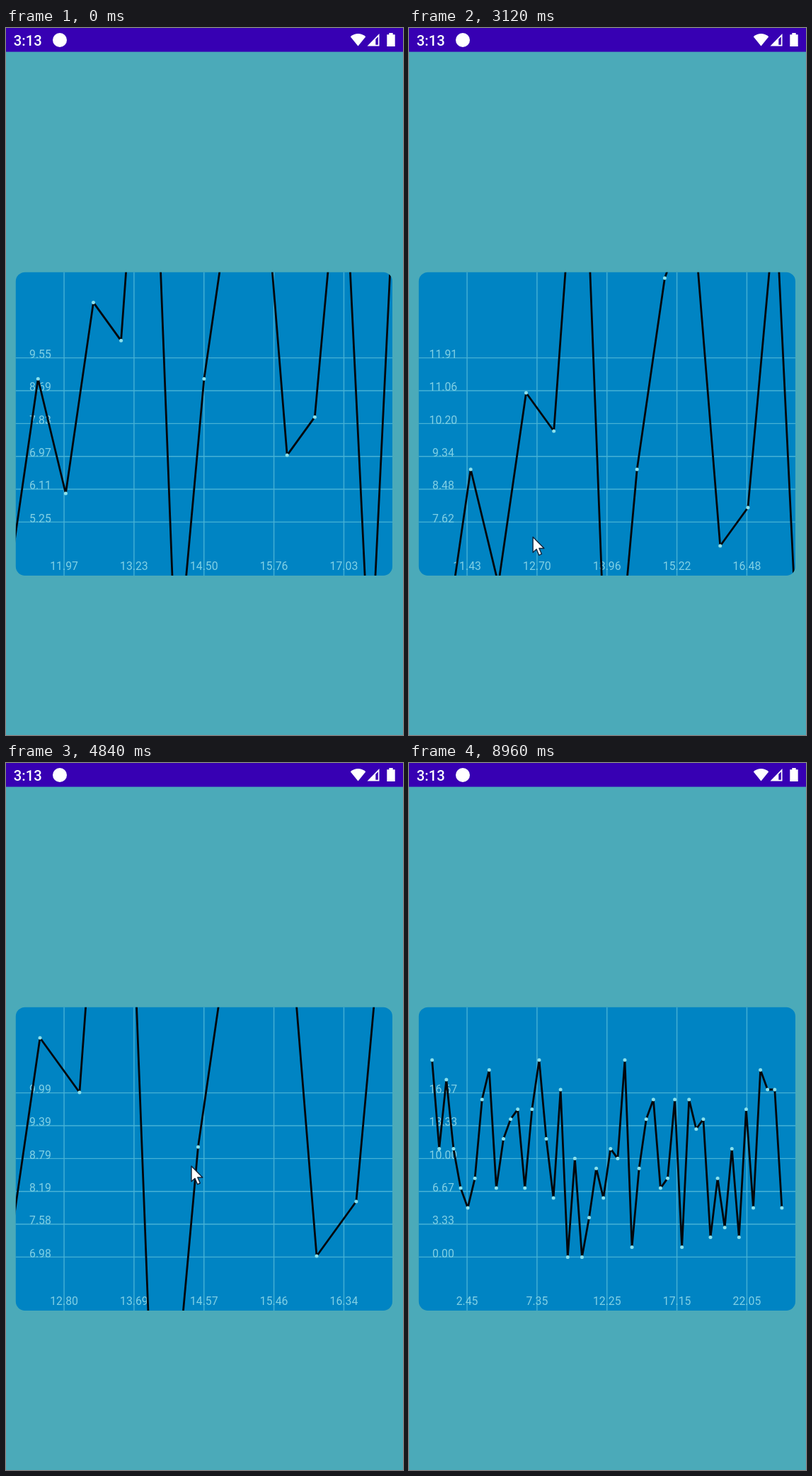
Recreate the animation shown at these times as an HTML page with a canvas. Size 561 by 998 pixels, loop 9000 ms.

```html
<!DOCTYPE html>
<html lang="en">
<head>
<meta charset="utf-8">
<title>Zoomable line chart</title>
<style>
  html, body { margin: 0; width: 100%; height: 100%; overflow: hidden; background: #4baab9; }
  canvas { display: block; width: 561px; height: 998px; }
</style>
</head>
<body>
<canvas id="stage" width="561" height="998"></canvas>
<script>
const ctx = document.getElementById('stage').getContext('2d');
const LOOP = 9000;

const CARD = { x: 13.8, y: 344.7, w: 532.2, h: 428.4, r: 13 };
const MID_X = 279.75, STEP_X = 98.85, UNIT_X = STEP_X / 4.9;
const BASE_Y = 697.4, STEP_Y = 46.35, UNIT_Y = STEP_Y * 0.3;

// The charted readings, one for every half unit of x
const DATA = [
  20, 11, 18, 11, 7, 5, 8, 16, 19, 7, 12, 14, 15, 7, 15, 20, 12, 6, 17, 0,
  10, 0, 4, 9, 6, 11, 10, 20, 1, 9, 14, 16, 7, 8, 16, 1, 16, 13, 14, 2,
  8, 3, 11, 2, 15, 5, 19, 17, 17, 5
];

// Offsets are stored scaled by the zoom, so blending two views keeps the zoom focus still
const makeView = (zoom, x, y) => ({ zoom, x: x * zoom, y: y * zoom });
const FIRST = makeView(3.877, 14.498, 5.25);
const HOME = makeView(1, 12.25, 0);
const NEAR = makeView(2.845, 12.197, 5.721);
const CLOSE = makeView(5.537, 15.398, 9.177);

const RESET_1 = 1400, PINCH = 1920, PINCH_END = 2600, SPREAD = 2740, SPREAD_END = 3640;
const DRAG = 4080, DRAG_END = 4480, RESET_2 = 5000;
const HOVER = 5760, HOVER_TURN = 760, POINTER_IN = 800, POINTER_OUT = 7900;

const mix = (a, b, p) => a + (b - a) * p;

function ease(t, from, to) {
  const p = Math.min(1, Math.max(0, (t - from) / (to - from)));
  return p * p * (3 - 2 * p);
}

function pointerAt(t) {
  let x = 312, y = 1000;
  const move = (from, to, nx, ny) => {
    const p = ease(t, from, to);
    x = mix(x, nx, p);
    y = mix(y, ny, p);
  };
  move(POINTER_IN, RESET_1 - 80, 302, 662);
  move(RESET_1 + 280, PINCH, 237, 614);
  move(PINCH, PINCH_END, 158, 687);
  move(SPREAD, 3760, 212.5, 787);
  move(3760, 3880, 205, 832);
  move(3880, DRAG, 170, 738);
  move(DRAG, DRAG_END, 262, 569);
  move(HOVER, HOVER + HOVER_TURN, 238, 568);

  // two small circles while hovering
  const turn = Math.min(2, Math.max(0, (t - HOVER) / HOVER_TURN)) * Math.PI * 2;
  return { x: x - 8 * Math.sin(turn), y: y + 10 * (1 - Math.cos(turn)) };
}

function viewAt(t) {
  if (t < RESET_1) return FIRST;
  if (t < PINCH || t >= RESET_2) return HOME;
  const [a, b, p] = t < SPREAD
    ? [HOME, NEAR, ease(t, PINCH, PINCH_END)]
    : [NEAR, CLOSE, ease(t, SPREAD, SPREAD_END)];
  const view = { zoom: mix(a.zoom, b.zoom, p), x: mix(a.x, b.x, p), y: mix(a.y, b.y, p) };
  if (t > DRAG) {
    const grab = pointerAt(DRAG), now = pointerAt(t);
    view.x -= (now.x - grab.x) / UNIT_X;
    view.y += (now.y - grab.y) / UNIT_Y;
  }
  return view;
}

function disc(x, y, r) {
  ctx.beginPath();
  ctx.arc(x, y, r, 0, Math.PI * 2);
  ctx.fill();
}

function fillPath(d, color) {
  ctx.fillStyle = color;
  ctx.fill(new Path2D(d));
}

function drawStatusBar() {
  ctx.fillStyle = '#3700b3';
  ctx.fillRect(0, 0, 561, 33.6);
  ctx.fillStyle = '#fff';
  ctx.font = '500 20.3px Roboto, sans-serif';
  ctx.textAlign = 'left';
  ctx.fillText('3:13', 10.8, 24.6);
  disc(76, 17, 10);
  fillPath('M497.5 25.5 L486.7 12.2 Q497.5 4 508.3 12.2 Z', '#fff');     // wifi
  fillPath('M510.5 25.5 L527.5 8 V25.5 Z', '#fff');                      // signal
  fillPath('M522.3 15.8 L525.8 12.2 V23.8 H522.3 Z', '#3700b3');
  fillPath('M538.3 9.2 H541.3 V7 H546.7 V9.2 H549.7 V26 H538.3 Z', '#fff'); // battery
}

function drawChart(view) {
  const toX = v => MID_X + (v * view.zoom - view.x) * UNIT_X;
  const toY = v => BASE_Y - (v * view.zoom - view.y) * UNIT_Y;
  const label = (value, x, y) => ctx.fillText((value / view.zoom).toFixed(2), x, y);

  ctx.save();
  ctx.beginPath();
  ctx.roundRect(CARD.x, CARD.y, CARD.w, CARD.h, CARD.r);
  ctx.fillStyle = '#0084c3';
  ctx.fill();
  ctx.clip();

  ctx.fillStyle = '#82d0e4';
  ctx.font = '15.8px Roboto, sans-serif';
  ctx.textAlign = 'center';
  ctx.strokeStyle = 'rgba(128, 215, 228, 0.55)';
  ctx.lineWidth = 1.4;
  ctx.beginPath();
  for (let i = -2; i <= 2; i++) {
    const x = MID_X + i * STEP_X;
    ctx.moveTo(x, CARD.y);
    ctx.lineTo(x, CARD.y + CARD.h);
    label(view.x + i * 4.9, x, 765.2);
  }
  for (let i = 0; i < 6; i++) {
    const y = BASE_Y - i * STEP_Y;
    ctx.moveTo(CARD.x, y);
    ctx.lineTo(CARD.x + CARD.w, y);
    label(view.y + i * 10 / 3, 48.4, y + 0.4);
  }
  ctx.stroke();

  ctx.strokeStyle = '#04070c';
  ctx.lineWidth = 2.8;
  ctx.lineJoin = 'bevel';
  ctx.beginPath();
  DATA.forEach((v, i) => ctx.lineTo(toX(i / 2), toY(v)));
  ctx.stroke();
  ctx.fillStyle = '#8be0ec';
  DATA.forEach((v, i) => disc(toX(i / 2), toY(v), 2.5));
  ctx.restore();
}

function drawPointer({ x, y }) {
  const arrow = new Path2D('M0 0 V21.8 L5 17.4 L8.6 25.8 L12.3 24 L8.8 16 H15.8 Z');
  ctx.save();
  ctx.translate(x, y);
  ctx.fillStyle = '#fff';
  ctx.fill(arrow);
  ctx.strokeStyle = '#10243c';
  ctx.lineWidth = 1.4;
  ctx.lineJoin = 'round';
  ctx.stroke(arrow);
  ctx.restore();
}

function draw(now) {
  const t = now % LOOP;
  ctx.fillStyle = '#4baab9';
  ctx.fillRect(0, 0, 561, 998);
  drawStatusBar();
  drawChart(viewAt(t));
  if (t >= POINTER_IN && t < POINTER_OUT) drawPointer(pointerAt(t));
  requestAnimationFrame(draw);
}
requestAnimationFrame(draw);
</script>
</body>
</html>
```
